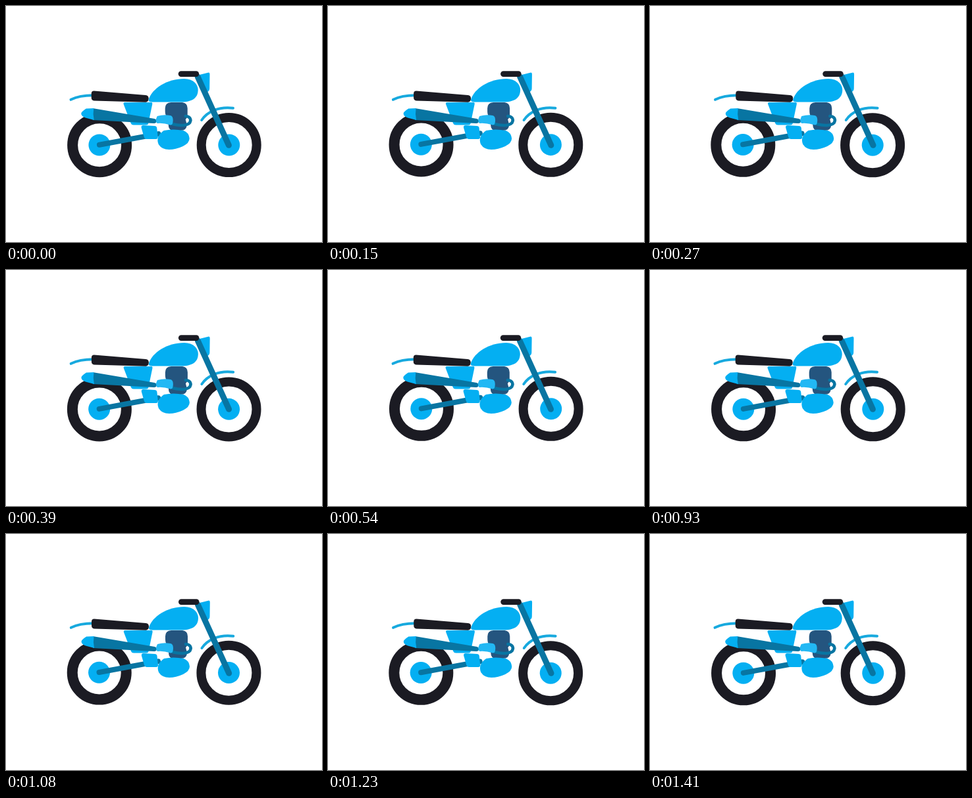
Animation, 480 px wide and 360 px high, one loop 1.44 s. Source, as an HTML page:

```html
<!DOCTYPE html>
<html lang="en">
<head>
<meta charset="utf-8">
<title>Motorbike</title>
<style>
  html, body { margin: 0; width: 100%; height: 100%; overflow: hidden; background: #fff; }
  svg { display: block; width: 100vw; height: 100vh; }
  .sky { fill: #04aff2; }
  .pale { fill: #22b8f4; }
  .teal { fill: #0875a2; }
  .navy { fill: #24557f; }
  .ink { fill: #1b1b23; }
  .line { fill: none; stroke-linecap: round; stroke-linejoin: round; }
  .line.sky { stroke: #17a9de; stroke-width: 4; }
  .line.teal { stroke: #0875a2; }
  .tyre { fill: none; stroke: #1b1b23; }
</style>
</head>
<body>
<svg viewBox="0 0 480 360">
  <g id="rear">
    <circle class="tyre" stroke-width="16" cx="141.7" cy="211.9" r="41"/>
    <circle class="sky" cx="141.5" cy="211.7" r="16.5"/>
    <path class="line teal" stroke-width="8" d="M141.5 211.4 L231 194.8"/>
  </g>
  <g id="front">
    <circle class="tyre" stroke-width="14" cx="338.4" cy="212.1" r="42"/>
    <circle class="sky" cx="338.5" cy="212" r="16.5"/>
  </g>

  <g id="body">
    <path class="line sky" d="M98.8 142.8 Q112 136.2 132 136.2"/>
    <path class="line sky" d="M297.5 174 C306 161.5 323 153 345.3 155.8"/>
    <path class="sky" d="M181 147 H221 Q223 147 222.5 150 L216.5 179 Q216 181.5 213 181.5 H194 Q191 181.5 190 179 L179 150 Q178 147 181 147 Z"/>

    <path class="navy" d="M251 147 H268 Q276 148 276 156 V165 Q276 170 273 173 L275 181 Q275 190 265 190 H255 Q247 190 247 181 V172 Q242 168 242 161 V156 Q242 147.5 251 147 Z"/>
    <path class="line teal" stroke-width="4.5" d="M253 180 C264 183 275 183 279.5 178 C283 172 278 168 273 168"/>

    <path class="sky" d="M209 182 L226 183 Q229 183 229.5 186 L231 200 Q231 203 228 203 H214 Q211 203 210 200 L206 186 Q205 182 209 182 Z"/>
    <path class="sky" d="M240 190 Q254 187 270 190 Q278 193 279 202 Q279 209 269 214 Q258 219 248 219 Q237 219 232 211 Q227 199 240 190 Z"/>

    <path class="teal" d="M132 156 L226 172 Q229 173 229 175 Q229 179 225 179 L132 174 Z"/>
    <path class="sky" d="M122 156.5 L133.5 156 Q132 165 134 174 L121 170.5 Q114.5 168 114.5 164 Q114.5 161.5 122 156.5 Z"/>
    <path class="pale" d="M230 168 Q240 165 250 167 Q254 168 254 174 Q254 182 250 181.5 Q239 178 230 179 Q226 176 230 168 Z"/>

    <path class="ink" d="M134 129.6 L212.5 136 Q217 136.5 217 141.3 Q216.5 147 212 146.7 L134 144.4 Q130 144 130 140 V133.6 Q130 129.6 134 129.6 Z"/>
    <path class="sky" d="M217 142.5 C222 126 245 111 271 111 C285 111 292 120 292 128 C292 141 282 146.5 266 146.5 H222 Q216 146.5 217 142.5 Z"/>

    <path class="sky" d="M294 105 L307 101.7 Q309.8 101 309.8 104 L309.5 126 Q309.5 131 303 132 Z"/>
    <path class="line teal" stroke-width="9" d="M291.5 108 L338.7 212.3"/>
    <rect class="ink" x="262" y="99.3" width="31.5" height="8.6" rx="4.3"/>
  </g>
</svg>
<script>
  const LOOP = 1440, STEP = 30, TURNS = 3;
  const part = id => document.getElementById(id);
  const rear = part('rear'), front = part('front'), body = part('body');
  const shift = (el, x, y) => el.setAttribute('transform', `translate(${x.toFixed(2)} ${y.toFixed(2)})`);

  // Slightly eccentric wheels, with the frame shaking against them.
  function draw(now) {
    const time = Math.floor((now % LOOP) / STEP) * STEP;
    const turn = time / LOOP * TURNS * 2 * Math.PI;
    const swing = Math.cos(turn);
    shift(rear, 0.4 * swing, 0.5 * Math.cos(turn + 0.9));
    shift(front, 0.3 * swing, -0.4 * Math.sin(turn));
    shift(body, -0.3 * swing, 0);
  }

  const start = performance.now();
  function tick() {
    draw(performance.now() - start);
    requestAnimationFrame(tick);
  }
  tick();
</script>
</body>
</html>
```
